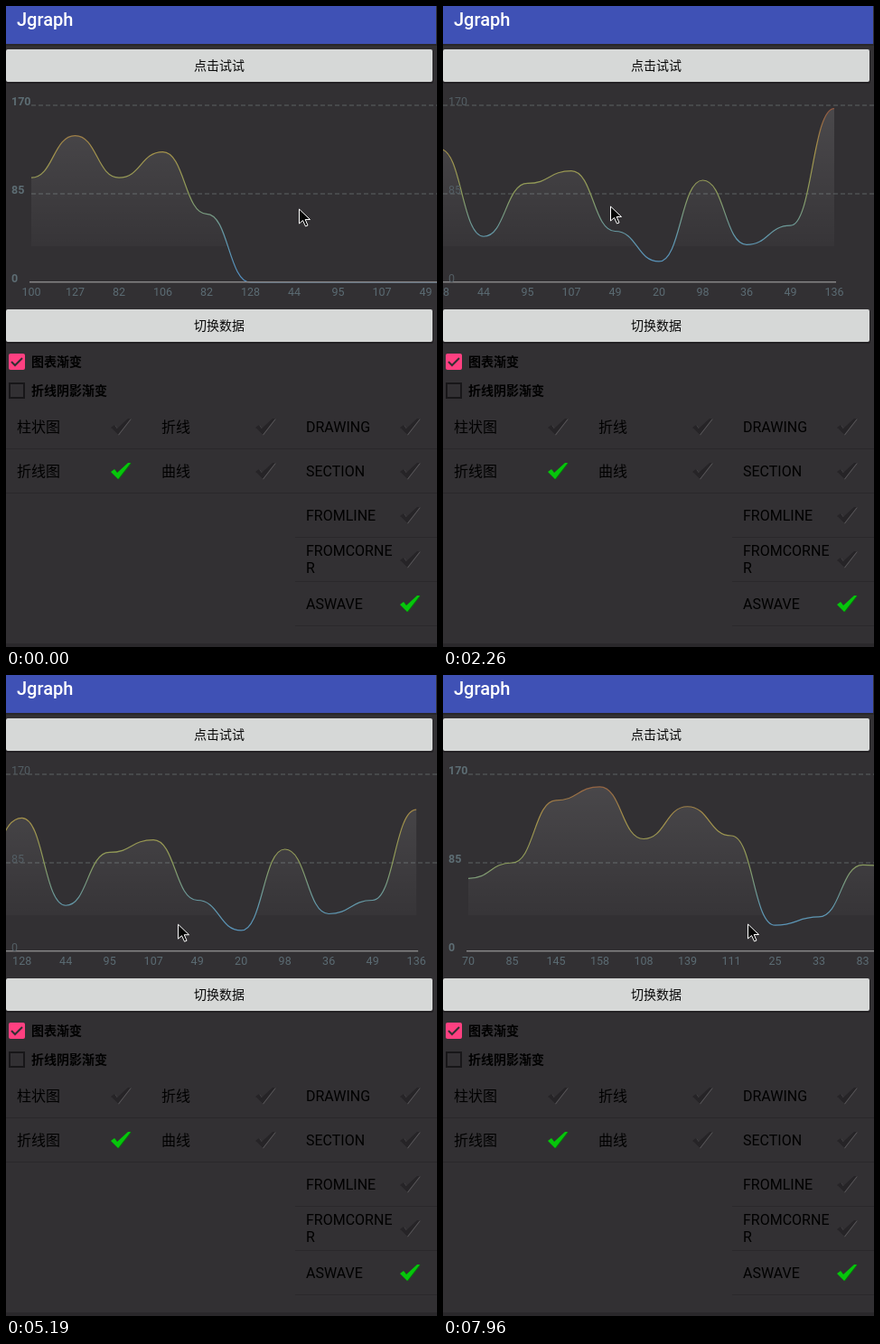
These frames come from a looping animation (477x710 px, 8000 ms). An HTML page with a canvas:

```html
<!DOCTYPE html>
<html lang="zh">
<head>
<meta charset="utf-8">
<style>
html, body { margin: 0; width: 100%; height: 100%; overflow: hidden; background: #323033; }
canvas { display: block; }
</style>
</head>
<body>
<canvas id="stage" width="477" height="710"></canvas>
<script>
const ctx = document.getElementById('stage').getContext('2d');
const LOOP = 8000, SWITCH = 6450;
const TOP = 110, BASE = 306, MAX = 170, LEFT = 28, GAP = 48.5;
const BG = '#323033';
const before = [100, 127, 82, 106, 82, 128, 44, 95, 107, 49, 20, 98, 36, 49, 136];
const after = [70, 85, 145, 158, 108, 139, 111, 25, 33, 83, 79, 72, 72, 99, 117];

// The drag: what the pointer and the chart have reached at a few moments
const drag = [
  { at: 0, scroll: 0, x: 324, y: 225 },
  { at: 150, scroll: 0, x: 324, y: 225 },
  { at: 1400, scroll: -134.5, x: 282, y: 229 },
  { at: 2260, scroll: -274, x: 185, y: 222 },
  { at: 4460, scroll: -268, x: 213, y: 243 },
  { at: 4580, scroll: -214.5, x: 262, y: 245 },
  { at: 5480, scroll: -271, x: 156, y: 291 },
  { at: 5900, scroll: -271, x: 134, y: 356 },
  { at: SWITCH, scroll: -271, x: 134, y: 356 },
  { at: 7140, scroll: -281, x: 123, y: 260 },
  { at: 7960, scroll: 0, x: 337, y: 276 }
];

const mix = (a, b, p) => a + (b - a) * p;
const clamp01 = v => Math.max(0, Math.min(1, v));
const easeInOut = p => (1 - Math.cos(Math.PI * clamp01(p))) / 2;
const overshoot = p => 1 + (1 - p) ** 2 * (3.9 * p - 1);
const yOf = value => mix(BASE, TOP, value / MAX);

function dragAt(t) {
  const next = drag.findIndex(k => k.at > t);
  if (next < 0) return drag[drag.length - 1];
  const a = drag[next - 1], b = drag[next], p = (t - a.at) / (b.at - a.at);
  return { scroll: mix(a.scroll, b.scroll, p), x: mix(a.x, b.x, p), y: mix(a.y, b.y, p) };
}

function gradient(y0, y1, colors) {
  const g = ctx.createLinearGradient(0, y0, 0, y1);
  colors.forEach((c, i) => g.addColorStop(i / (colors.length - 1), c));
  return g;
}
const lineColor = gradient(TOP, BASE, ['#8e523f', '#a5924a', '#8c9c5b', '#6098ae', '#5290c6']);
const fillColor = gradient(TOP, 266, ['rgba(255,255,255,.12)', 'rgba(255,255,255,.025)']);
fillColor.addColorStop(1, 'rgba(255,255,255,0)');

function rect(x, y, w, h, color, radius = 0) {
  ctx.fillStyle = color;
  ctx.beginPath();
  ctx.roundRect(x, y, w, h, radius);
  ctx.fill();
}

function text(str, x, y, size, color, weight = 400, align = 'left') {
  ctx.font = `${weight} ${size}px Roboto, "Noto Sans CJK SC", "Noto Sans CJK", sans-serif`;
  ctx.textAlign = align;
  ctx.fillStyle = color;
  ctx.fillText(str, x, y);
}

function trace(points, x = 0, y = 0) {
  ctx.beginPath();
  points.forEach(([px, py]) => ctx.lineTo(x + px, y + py));
}

function stroke(color, width) {
  ctx.strokeStyle = color;
  ctx.lineWidth = width;
  ctx.stroke();
}

function fill(color) {
  ctx.fillStyle = color;
  ctx.fill();
}

function button(label, y) {
  rect(0, y + 1, 473, 37, '#242225', 2);
  rect(0, y, 472, 36, '#d6d8d7', 2);
  text(label, 236, y + 23, 14, '#0a0a0a', 500, 'center');
}

function checkbox(label, y, checked) {
  if (checked) {
    rect(3, y, 18, 18, '#ff4081', 2);
    trace([[3, 9], [7, 13], [15, 5]], 3, y);
    stroke(BG, 2);
  } else {
    ctx.beginPath();
    ctx.rect(4, y + 1, 16, 16);
    stroke('#171618', 2);
  }
  text(label, 28, y + 14, 14, '#000', 700);
}

function tick(x, y, on) {
  const shape = [[-11, 2], [-7, -1], [-4, 3], [8, -8], [11, -8], [-3, 10]];
  trace(shape, x + 0.8, y + 0.6);
  fill(on ? '#08750d' : '#59575a');
  trace(shape, x, y);
  fill(on ? '#06c60b' : '#262427');
}

function item(lines, column, row, on) {
  const x = column * 160, top = 441 + row * 49;
  rect(x, top + 49, 160, 1, '#2a282b');
  lines.forEach((s, i) => text(s, x + 12, top + 31 + i * 19 - (lines.length - 1) * 10, 16, '#000'));
  tick(x + 127, top + 24, on);
}

function drawPage() {
  rect(0, 0, 477, 710, BG);
  rect(0, 0, 476, 42, '#3f51b5');
  rect(0, 42, 477, 2, '#29272a');
  rect(0, 706, 477, 4, '#2a282b');
  text('Jgraph', 12, 22, 20, '#fff', 500);
  button('点击试试', 48);
  button('切换数据', 336);
  checkbox('图表渐变', 385, true);
  checkbox('折线阴影渐变', 417, false);
  const columns = [
    [['柱状图'], ['折线图']],
    [['折线'], ['曲线']],
    [['DRAWING'], ['SECTION'], ['FROMLINE'], ['FROMCORNE', 'R'], ['ASWAVE']]
  ];
  const chosen = [1, -1, 4];
  columns.forEach((rows, c) => rows.forEach((lines, r) => item(lines, c, r, r === chosen[c])));
}

function curve(points) {
  ctx.beginPath();
  ctx.moveTo(...points[0]);
  for (let i = 1; i < points.length; i++) {
    const [x0, y0] = points[i - 1], [x1, y1] = points[i], mid = (x0 + x1) / 2;
    ctx.bezierCurveTo(mid, y0, mid, y1, x1, y1);
  }
}

function drawChart(t, scroll) {
  const switched = t >= SWITCH;
  const morph = easeInOut((t - SWITCH) / 1000);
  const wave = 4.92 + 0.0053 * t;
  const points = before.map((v, i) => {
    const value = switched ? mix(v, after[i], morph) : v * overshoot(clamp01((wave - i) * 0.195));
    return [LEFT + i * GAP + scroll, yOf(value)];
  });
  const first = points[0][0], last = points[points.length - 1][0];

  ctx.setLineDash([5, 3]);
  for (const v of [MAX, MAX / 2]) {
    trace([[Math.max(0, first), yOf(v)], [477, yOf(v)]]);
    stroke('#4f5153', 1.3);
  }
  ctx.setLineDash([]);

  curve(points);
  ctx.lineTo(last, BASE);
  ctx.lineTo(first, BASE);
  fill(fillColor);
  curve(points);
  stroke(lineColor, 1.2);
  trace([[first - 2, 305.7], [last + 2, 305.7]]);
  stroke('#858486', 1.5);

  if (switched && morph < 1) {
    after.forEach((v, i) => rect(points[i][0] - 0.5, yOf(v) - 0.7, 1.4, 1.4, lineColor));
  }
  const labels = switched ? after : before;
  labels.forEach((v, i) => text(v, points[i][0], 321, 12.5, '#5b6b73', 400, 'center'));

  const resting = scroll === 0;
  for (const v of [MAX, MAX / 2, 0]) {
    text(v, 6, yOf(v), 12.5, resting ? '#5d6d74' : '#535e64', resting ? 600 : 400);
  }
}

function drawCursor(x, y) {
  trace([[0, 0], [0, 16], [4, 12.5], [7, 19], [9.5, 18], [6.7, 11.5], [12, 11.5]], x + 0.5, y);
  ctx.closePath();
  fill('#050505');
  stroke('#fff', 1);
}

function frame(now) {
  const t = now % LOOP;
  const { scroll, x, y } = dragAt(t);
  drawPage();
  drawChart(t, scroll);
  drawCursor(x, y);
  requestAnimationFrame(frame);
}
requestAnimationFrame(frame);
</script>
</body>
</html>
```
